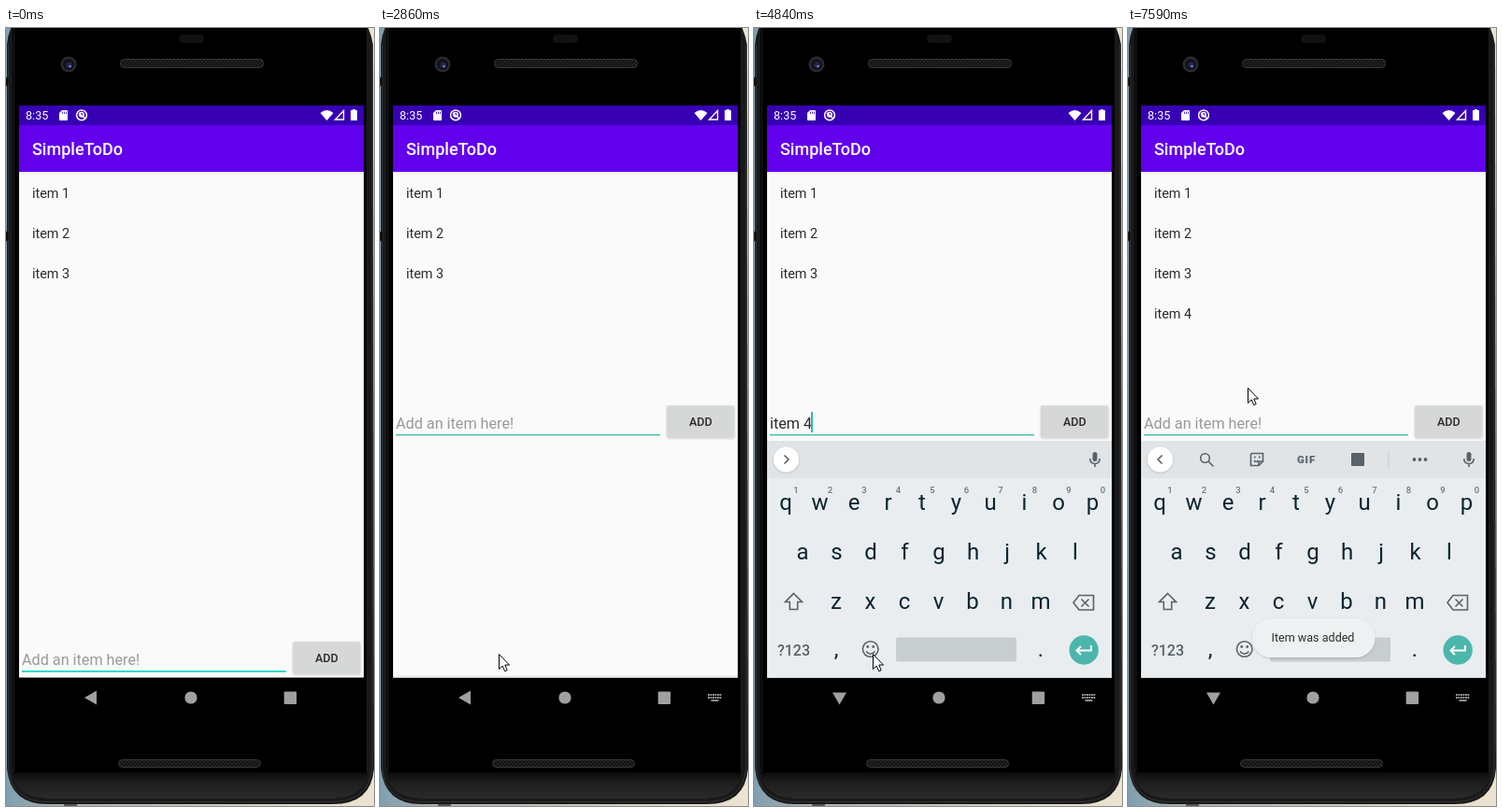
Animation of 394 by 833 pixels, one loop 8 s. Source, as an HTML page:

```html
<!DOCTYPE html>
<html lang="en">
<head>
<meta charset="utf-8">
<title>To-do list demo</title>
<style>
  html, body { margin: 0; width: 100%; height: 100%; overflow: hidden; background: #000; }
  svg { display: block; width: 100vw; height: 100vh; font-family: Roboto, sans-serif; }
  .mid { text-anchor: middle; }
  .line { fill: none; stroke: #596268; stroke-width: 1.6; }
  .icon { fill: #596268; }
</style>
</head>
<body>
<svg viewBox="0 0 394 833">
  <defs>
    <linearGradient id="desk">
      <stop offset="0" stop-color="#7f9fb0"/><stop offset=".15" stop-color="#a9b0ad"/><stop offset="1" stop-color="#ede4d0"/>
    </linearGradient>
    <linearGradient id="chin" x2="0" y2="1">
      <stop offset="0" stop-color="#0b0b0b"/><stop offset=".35" stop-color="#1d1d1d"/><stop offset="1" stop-color="#2b2b2b"/>
    </linearGradient>
    <linearGradient id="shade" x2="0" y2="1">
      <stop offset="0" stop-color="#e2e2e5"/><stop offset="1" stop-color="#fafafa"/>
    </linearGradient>
    <pattern id="mesh" width="4" height="4" patternUnits="userSpaceOnUse">
      <rect width="4" height="4" fill="#222"/><path d="M0 0L4 4M4 0L0 4" stroke="#111" stroke-width=".9"/>
    </pattern>
    <filter id="soft" x="-20%" y="-20%" width="140%" height="150%">
      <feDropShadow dx="0" dy=".8" stdDeviation=".8" flood-opacity=".2"/>
    </filter>
  </defs>

  <!-- desk and phone -->
  <rect width="394" height="833" fill="url(#desk)"/>
  <rect x="62" y="826" width="14" height="7" fill="#555"/>
  <path d="M1 18Q2 6 7 -4H386Q391 6 393 18L394 793Q391 831 350 831H44Q5 831 1 793Z" fill="#191919"/>
  <path d="M2.500 18V793Q6 828 44 828.500H350Q388 828 392 793V18" fill="none" stroke="#333"/>
  <path d="M7 -5V790Q9 824 44 825H350Q385 824 387 790V-5Z" fill="#000"/>
  <path d="M7 797H387Q383 824 350 825H44Q11 824 7 797Z" fill="url(#chin)"/>
  <path d="M8.500 0V796M386.500 0V796" stroke="#1c1c1c"/>
  <path d="M0 53H3V62H0ZM0 218H3V228H0Z" fill="#0a0a0a" stroke="#333" stroke-width=".7"/>
  <rect x="185" y="7" width="27" height="9" rx="4.500" fill="#121212"/>
  <g fill="url(#mesh)" stroke="#383838">
    <rect x="122.500" y="33.500" width="153" height="9" rx="4"/>
    <rect x="120.500" y="783.500" width="152" height="8" rx="4"/>
  </g>
  <circle cx="67" cy="39" r="8.500" fill="#2b2b2f"/>
  <circle cx="67" cy="39" r="6" fill="#111118"/>
  <circle cx="67.500" cy="39.500" r="3.200" fill="#22264f"/>
  <circle cx="68.500" cy="41" r="1.300" fill="#7986cf"/>

  <!-- app -->
  <rect x="14" y="83" width="369" height="612.500" fill="#fafafa"/>
  <rect x="14" y="154" width="369" height="2" fill="url(#shade)"/>
  <rect x="14" y="83" width="369" height="21" fill="#3700b3"/>
  <rect x="14" y="104" width="369" height="50" fill="#6200ee"/>
  <g fill="#fff">
    <text x="21" y="98" font-size="12.600">8:35</text>
    <text x="28" y="136" font-size="18" font-weight="500">SimpleToDo</text>
    <path d="M60 88H65Q66 88 66 89V98Q66 99 65 99H58Q57 99 57 98V91Z"/>
    <path d="M336.500 91Q343.500 85 350.500 91L343.500 99Z"/>
    <path d="M371 88V87H374V88H376V99H369V88Z"/>
  </g>
  <path d="M60.500 89.500V92M62.500 89.500V92M64.500 89.500V92" stroke="#3700b3" stroke-width=".8"/>
  <path d="M352.500 98H361.500V88.500Z" fill="none" stroke="#fff" stroke-width="1.400"/>
  <g fill="none" stroke="#fff" stroke-width="1.500">
    <circle cx="81" cy="93.300" r="5.400"/><circle cx="81" cy="92.700" r="2.200"/><path d="M78 91L85 97"/>
  </g>
  <g id="items" font-size="14.400" fill="#2a2a2a"></g>
  <rect id="strip" x="14" y="693" width="369" height="2.500" fill="#f0f0f0"/>
  <g id="entry">
    <rect id="underline" x="17" y="688" width="283"/>
    <text id="field" x="17" y="681.500" font-size="16.200"></text>
    <rect id="caret" y="664" width="2" height="22" fill="#26bfae"/>
    <rect id="button" x="307" y="657.300" width="72.500" height="34.500" rx="2" filter="url(#soft)"/>
    <text class="mid" x="343.300" y="679" font-size="12.570" font-weight="500" fill="#2a2a2a">ADD</text>
  </g>

  <!-- system buttons -->
  <g fill="#a0a0a0">
    <path id="back" d="M84 717L97 709.500V724.500Z"/>
    <circle cx="198" cy="717" r="6.600"/>
    <rect x="297.700" y="710.500" width="13.400" height="13.400" rx="1"/>
  </g>
  <g id="switcher" stroke="#a0a0a0" stroke-width="1.800">
    <path d="M351 714H365.500M351 717H365.500" stroke-dasharray="1.800 .7"/>
    <path d="M354.500 720H362.500"/>
  </g>

  <g id="keyboard">
    <rect x="14" y="442" width="369" height="253.500" fill="#e9edf0"/>
    <rect x="14" y="442" width="369" height="40" fill="#e0e4e7"/>
    <circle cx="34.500" cy="462" r="13.500" fill="#fff" filter="url(#soft)"/>
    <path id="chevron" class="line" d="M32.500 457.500L37 462L32.500 466.500"/>
    <g id="words" font-size="15.600">
      <path d="M143.500 451V473M251.500 451V473" stroke="#c3c8cb"/>
      <text class="mid" x="95" y="468" fill="#6d757a"></text>
      <text class="mid" x="197" y="468" fill="#111" font-weight="700"></text>
      <text class="mid" x="299" y="468" fill="#6d757a"></text>
    </g>
    <g id="tools">
      <circle class="line" cx="82.500" cy="460.500" r="4.800"/>
      <path class="line" d="M86 464L91.500 469.500" stroke-width="2"/>
      <path class="line" d="M132.500 455.500H144.500V464L140 468.500H131.500V456.500ZM144.500 464H140V468.500M135 463Q137 466 139.500 463"/>
      <path class="icon" d="M135 458.500h1.600v2h-1.600zM140 458.500h1.600v2h-1.600z"/>
      <text class="mid icon" x="191" y="466" font-size="11.500" font-weight="900" letter-spacing=".8">GIF</text>
      <rect class="icon" x="239" y="455" width="14" height="14" rx="1"/>
      <path d="M279 452V472" stroke="#c8cdd0"/>
      <g class="icon"><circle cx="306.500" cy="462" r="1.900"/><circle cx="312.500" cy="462" r="1.900"/><circle cx="318.500" cy="462" r="1.900"/></g>
    </g>
    <rect class="icon" x="362.500" y="454" width="5" height="10" rx="2.500"/>
    <path class="line" d="M359.700 461Q360 466.500 365 466.500T370.300 461M365 466.500V470"/>
    <g id="keys" class="mid" font-size="24" fill="#0b2430"></g>
    <path class="line" d="M42.500 605.500L51.500 614.500H46.700V622.500H38.300V614.500H33.500Z"/>
    <path class="line" d="M348 607.500H363.500V623H348L342 615.300ZM350.500 611.500L358.500 619.500M358.500 611.500L350.500 619.500"/>
    <text class="mid icon" x="42.500" y="671.500" font-size="16" font-weight="500">?123</text>
    <circle class="line" cx="124.700" cy="665" r="8.300"/>
    <path class="line" d="M120 667.500Q124.700 673 129.400 667.500"/>
    <g class="icon"><circle cx="121.700" cy="662.500" r="1.400"/><circle cx="127.700" cy="662.500" r="1.400"/></g>
    <rect x="152" y="652.500" width="129" height="26" rx="2.500" fill="#c8cdd0"/>
    <circle cx="353.200" cy="666" r="15.700" fill="#4db6ac"/>
    <path d="M361 661V666.500H346M350 662L345.500 666.500L350 671" fill="none" stroke="#fff" stroke-width="1.900"/>
  </g>

  <g id="toast">
    <rect x="133" y="632" width="131.500" height="42" rx="21" fill="#eef1f2" filter="url(#soft)"/>
    <text class="mid" x="198" y="657.300" font-size="12.570" fill="#2c2c2c">Item was added</text>
  </g>
  <path id="mouse" d="M.5 .5V16.500L4.200 13L6.700 18.700L9.200 17.600L6.800 12H11.500Z" fill="#fff" stroke="#000" stroke-linejoin="round"/>
</svg>

<script>
const LOOP = 8000;
const $ = id => document.getElementById(id);

function addText(parent, x, y, content, attrs = {}) {
  const el = document.createElementNS("http://www.w3.org/2000/svg", "text");
  for (const [k, v] of Object.entries({ x, y, ...attrs })) el.setAttribute(k, v);
  el.textContent = content;
  return $(parent).appendChild(el);
}

const items = [1, 2, 3, 4].map(n => addText("items", 28, 138.5 + 43 * n, "item " + n));

[["qwertyuiop", 34, 516], ["asdfghjkl", 52, 569], ["zxcvbnm", 88, 622]].forEach(([row, x, y]) =>
  [...row].forEach((key, i) => addText("keys", x + 36.5 * i, y, key)));
[..."1234567890"].forEach((digit, i) =>
  addText("keys", 45 + 36.5 * i, 498, digit, { "font-size": 9.5, "font-weight": 500, fill: "#6d757a" }));
addText("keys", 88, 673, ",");
addText("keys", 307, 673, ".");

// Each track lists [start time, ...values]; values hold until the next entry.
const mouseTrack = [
  [0, -50, 0], [710, 342, 380], [830, 180, 393], [950, 193, 313], [1070, 151, 284],
  [1190, 92, 266], [1340, 96, 264], [1650, 94, 344], [1770, 95, 284], [1920, 95, 266],
  [2170, 95, 272], [2320, 102, 400], [2440, 118, 550], [2560, 129, 662], [2710, 131, 666],
  [2860, 127, 670], [5360, 150, 645], [5480, 230, 540], [5600, 302, 441], [5750, 334, 390],
  [5870, 328, 411], [6020, 320, 421], [6530, 300, 413], [6680, 250, 405], [6800, 185, 396],
  [6920, 128, 391], [7070, 128, 386], [7340, 128, 385]
];
const typing = [
  [0, ""], [3820, "i", "i", "I", "I'm"], [3970, "ite", "ite", "item", "it's"],
  [4130, "item", "items", "item", "itemized"], [4840, "item 4"], [6170, ""]
];
const caretTrack = [
  [0, 0], [150, 1], [710, 0], [1190, 1], [1650, 0], [2170, 1], [2710, 0], [3160, 1], [3690, 0],
  [3820, 1], [4560, 0], [4840, 1], [5360, 0], [5870, 1], [6680, 0], [7070, 1], [7590, 0]
];
const keyboardTrack = [[0, 0], [3010, .7], [3160, 1]];
const addedTrack = [[0, 0], [6170, .1], [6290, .4], [6410, .75], [6530, 1]];

const at = (track, t) => track.findLast(entry => entry[0] <= t).slice(1);
const show = (id, visible) => $(id).setAttribute("visibility", visible ? "visible" : "hidden");

function render(t) {
  const raised = t >= 2860;
  const [text, ...words] = at(typing, t);
  const [keyboard] = at(keyboardTrack, t);
  const [added] = at(addedTrack, t);

  $("entry").setAttribute("transform", `translate(0 ${raised ? -253 : 0})`);
  $("underline").setAttribute("fill", raised ? "#42bbaa" : "#13d6c6");
  $("underline").setAttribute("height", raised ? 1.4 : 1.7);
  show("strip", raised);
  show("switcher", raised);

  const field = $("field");
  field.textContent = text || "Add an item here!";
  field.setAttribute("fill", text ? "#2a2a2a" : "#999");
  field.setAttribute("text-decoration", words.length ? "underline" : "none");
  $("caret").setAttribute("x", 17 + (text ? Math.floor(field.getComputedTextLength()) - 1 : 0));
  show("caret", at(caretTrack, t)[0]);

  $("keyboard").setAttribute("opacity", keyboard);
  $("back").setAttribute("transform", keyboard ? `rotate(${keyboard < 1 ? -45 : -90} 91.5 717)` : "");
  show("tools", !text);
  show("words", words.length);
  $("words").querySelectorAll("text").forEach((el, i) => el.textContent = words[i] || "");
  $("chevron").setAttribute("transform", text ? "" : "rotate(180 34.5 462)");

  const gray = Math.round(added ? 184 + 30 * (added - .1) / .9 : 214);
  $("button").setAttribute("fill", `rgb(${gray},${gray + 1},${gray + 1})`);
  items[3].setAttribute("opacity", added);
  $("toast").setAttribute("opacity", added);
  $("mouse").setAttribute("transform", `translate(${at(mouseTrack, t)})`);
}

const start = performance.now();
function tick() {
  render((performance.now() - start) % LOOP);
  requestAnimationFrame(tick);
}
tick();
</script>
</body>
</html>
```
